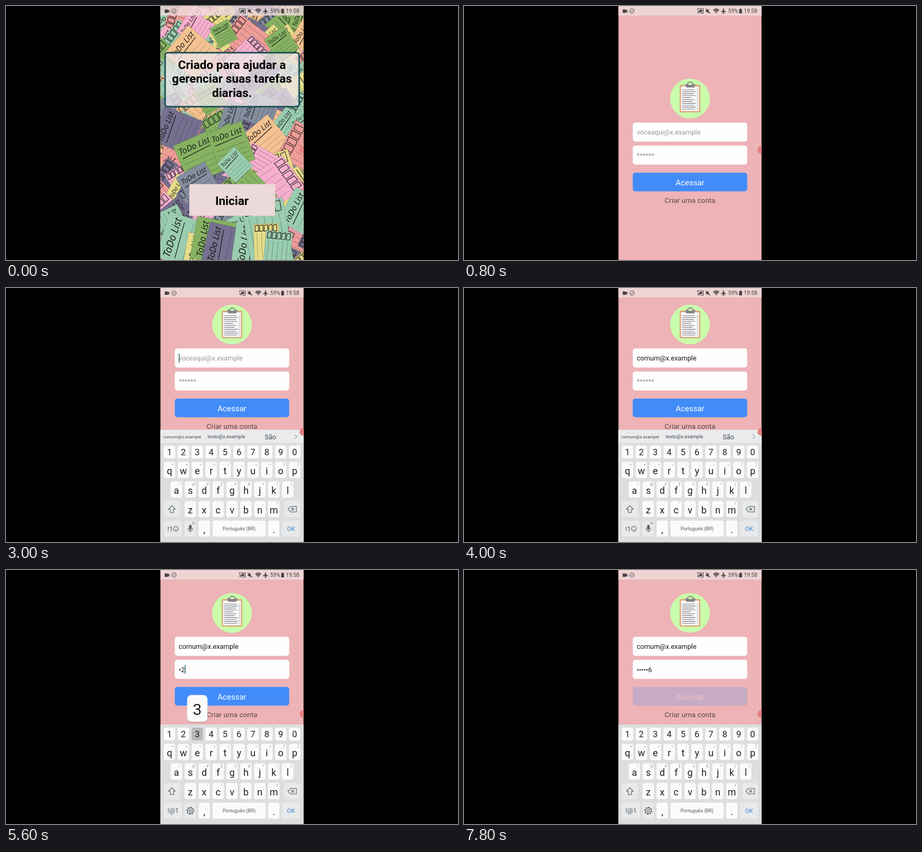
An HTML page that plays this animation: 853 px wide and 480 px high, repeating every 8000 ms.

```html
<!DOCTYPE html>
<html lang="pt-BR">
<head>
<meta charset="utf-8">
<title>Lista de tarefas</title>
<style>
  html, body { margin: 0; width: 100%; height: 100%; overflow: hidden; background: #000; }
  #stage { display: block; width: 100vw; height: 100vh; }
  text { font-family: Roboto, sans-serif; white-space: pre; }
  .note { font-family: "Open Sans", sans-serif; font-style: italic; }
  .mid { text-anchor: middle; }
</style>
</head>
<body>
<svg id="stage" viewBox="0 0 853 480">
  <svg id="phone" x="291.5" width="270" height="480" viewBox="291.5 0 270 480"></svg>
</svg>
<script>
const LOOP = 8000;
const PLACEHOLDER = 'voceaqui@x.example', MAIL = 'comum@x.example', OTHER_MAIL = 'texto@x.example';

// Markup helpers
const esc = s => s.replace(/&/g, '&amp;').replace(/</g, '&lt;');
const rect = (x, y, w, h, fill, r = 0, extra = '') =>
  `<rect x="${x}" y="${y}" width="${w}" height="${h}" rx="${r}" fill="${fill}" ${extra}/>`;
const text = (s, x, y, size, fill, extra = '') =>
  `<text x="${x}" y="${y}" font-size="${size}" fill="${fill}" ${extra}>${esc(s)}</text>`;
const centred = (s, x, y, size, fill, extra = '') => text(s, x, y, size, fill, 'class="mid" ' + extra);
const stroke = (d, color, width = 1, extra = '') =>
  `<path d="${d}" fill="none" stroke="${color}" stroke-width="${width}" ${extra}/>`;
const group = (id, body, extra = '') => `<g id="${id}" ${extra}>${body}</g>`;

// Paper notes behind the start screen
const PAPER = ['#ee9c98', '#f5afcd', '#86b262', '#9acdb0', '#848e9f', '#75708f', '#e6dc88', '#f3c290'];
const [SALMON, PINK, GREEN, MINT, SLATE, PURPLE, YELLOW, PEACH] = PAPER.keys();

function note([x, y, angle, w, color], boxes) {
  const h = w * (boxes ? 1.5 : 1.1);
  let body = rect(-w / 2, -w * .24, w, h, PAPER[color], 0, 'stroke="#000" stroke-opacity=".2" stroke-width=".8"');
  if (boxes) {
    let frames = '', rules = '';
    for (let i = 0; i < 5; i++) {
      const left = w * (i * .18 - .43);
      frames += `M${left} ${-w * .18}l${w * .13} ${-w * .02}v${w * .24}l${-w * .14} ${w * .01}z`;
      rules += `M${left + w * .06} ${w * .12}v${w * .95}`;
    }
    body += stroke(frames, '#1d1b1b', 1.1) + stroke(rules, '#000', .7, 'opacity=".4"');
  } else {
    body += text('ToDo List', 0, w * .05, w * .215, '#161616', 'class="note mid"')
      + stroke(`M${-w * .4} ${w * .16}L${w * .38} ${w * .12}`, '#161616', 1.2)
      + stroke([.32, .46, .6, .74].map(k => `M${-w * .42} ${w * k}h${w * .84}`).join(''), '#000', .7, 'opacity=".35"');
  }
  return `<g transform="translate(${x} ${y}) rotate(${angle})">${body}</g>`;
}

function collage() {
  let seed = 11, out = '';
  const random = () => (seed = seed * 16807 % 2147483647) / 2147483647;
  for (let y = -15; y < 500; y += 32)
    for (let x = 280; x < 580; x += 34) {
      const leansRight = random() < .2;
      out += note([x + random() * 22, y + random() * 18, leansRight ? 45 + random() * 20 : -75 + random() * 45,
        44 + random() * 16, Math.floor(random() * 8)], random() < .5);
    }
  const lists = [
    [345, 34, -58, 50, PINK], [334, 74, -50, 70, PEACH], [405, 42, -28, 38, GREEN],
    [512, 60, -35, 46, GREEN], [378, 162, -30, 46, GREEN], [462, 190, -70, 56, SLATE],
    [303, 228, -68, 70, PURPLE], [478, 238, -40, 66, PEACH], [356, 266, -24, 74, GREEN],
    [417, 245, -20, 70, GREEN], [422, 290, -45, 46, MINT], [355, 322, -30, 62, SLATE],
    [545, 382, -62, 72, MINT], [316, 438, -72, 90, MINT], [354, 462, -80, 64, YELLOW],
    [373, 440, -80, 80, GREEN], [395, 450, -77, 78, PURPLE], [450, 452, -82, 86, MINT]];
  const checks = [
    [390, 28, -40, 46, YELLOW], [436, 46, -52, 58, SALMON], [472, 78, 45, 48, PINK],
    [342, 224, 20, 54, SALMON], [545, 258, -62, 76, SALMON], [500, 300, -18, 78, YELLOW],
    [464, 282, -60, 44, PINK], [528, 322, 55, 74, PINK], [438, 326, -45, 60, GREEN],
    [486, 388, -10, 80, MINT], [491, 423, -2, 48, YELLOW], [515, 438, 6, 50, MINT]];
  return out + checks.slice(0, 4).map(n => note(n, true)).join('') + lists.slice(0, 8).map(n => note(n)).join('')
    + checks.slice(4, 9).map(n => note(n, true)).join('') + lists.slice(8).map(n => note(n)).join('')
    + checks.slice(9).map(n => note(n, true)).join('');
}

const startScreen = () => collage()
  + rect(300.2, 88.2, 253, 102, 'rgba(240,232,236,.76)', 5, 'stroke="#1f5357" stroke-width="3"')
  + ['Criado para ajudar a', 'gerenciar suas tarefas', 'diarias.']
    .map((s, i) => centred(s, 426.5, 118.8 + i * 26.4, 22.5, '#000', 'font-weight="700"')).join('')
  + group('startButton', rect(346, 336.5, 162, 60, '#ecd9db')
    + centred('Iniciar', 426.5, 375.5, 22.5, '#000', 'font-weight="700"'));

function clipboard() {
  const rows = [24, 26, 22, 25, 17, 24, 20, 26, 23, 26, 25];
  const rowY = i => 158.4 + i * 3.65;
  return `<circle cx="426.5" cy="175" r="37.5" fill="#c9fdab"/>`
    + rect(407, 149, 39, 52, '#dba778', 2) + rect(409.5, 152, 34, 46.5, '#fbfbfd')
    + stroke(rows.map((w, i) => `M411.5 ${rowY(i)}h${w}`).join(''), '#8e8c92', 1.4)
    + rows.map((w, i) => `<circle cx="440.5" cy="${rowY(i)}" r="1.2" fill="none" stroke="#aaa" stroke-width=".6"/>`).join('')
    + '<path d="M417 147.5h20l-2.5 6.5h-15z" fill="#858388"/>'
    + '<ellipse cx="427" cy="147" rx="5" ry="3.2" fill="#c9fdab" stroke="#858388" stroke-width="2"/>';
}

const field = y => rect(318.5, y, 216, 36, '#fefefe', 5);
const loginScreen = () => clipboard()
  + field(220.3) + field(263.8)
  + text('', 326, 243.2, 12.75, '#999', 'id="mail"')
  + text('', 326, 286.5, 12.75, '#999', 'id="password"')
  + rect(0, 0, 1.4, 17, '#1d6868', 0, 'id="caret"')
  + group('loginButton', rect(318.5, 315, 216, 35.2, '#428cfa', 5) + centred('Acessar', 426.5, 338.6, 15, '#fff'))
  + centred('Criar uma conta', 426.5, 372, 13.5, '#5b4748');

// On-screen keyboard
const PITCH = 26.25, KEY = '#fafbfb', DARK_KEY = '#e7e9ea', INK = '#202225', SOFT = '#55595d';
const keyRow = (chars, hints, x, y) => [...chars].map((c, i) => {
  const cx = x + i * PITCH;
  return rect(cx - 10.7, y, 21.4, hints ? 30.5 : 24.5, KEY, 4)
    + centred(c, cx, y + (hints ? 23.2 : 18), hints ? 18 : 16.5, INK)
    + (hints ? centred(hints[i], cx + 6.3, y + 7.8, 6.8, '#8b8f93') : '');
}).join('');

function keyboard() {
  const mailKeys = text('!1', 304.5, 459.5, 13, SOFT)
    + '<circle cx="320.5" cy="455" r="4.8" fill="none" stroke="#55595d"/>'
    + stroke('M317.8 456.2q2.7 3.2 5.4 0M318.9 452.6v1.4M322.1 452.6v1.4', SOFT, .9)
    + rect(345.6, 447.5, 4.6, 9, SOFT, 2.3)
    + stroke('M343.5 453.5q0 5.2 4.4 5.2t4.4-5.2M347.9 458.7v3.3', SOFT, 1.1)
    + '<circle cx="354" cy="444.5" r="2" fill="none" stroke="#888" stroke-width="1.2" stroke-dasharray="1.2 .5"/>';
  const passwordKeys = text('!@1', 304.8, 459.2, 12.4, SOFT)
    + '<circle cx="347.8" cy="455" r="5.4" fill="none" stroke="#55595d" stroke-width="1.2"/>'
    + '<circle cx="347.8" cy="455" r="6.7" fill="none" stroke="#55595d" stroke-width="1.4" stroke-dasharray="2.6 2.66"/>'
    + '<circle cx="347.8" cy="455" r="2.2" fill="none" stroke="#55595d" stroke-width="1.1"/>';
  return rect(291, 292, 271, 200, '#dcdee0')
    + group('suggestions', rect(291, 268, 271, 24.3, '#e9ebed')
      + text(MAIL, 297, 284, 8.1, '#44484b') + text(OTHER_MAIL, 380.5, 284, 9.2, '#44484b')
      + centred('São', 499, 285.5, 12.5, '#44484b') + stroke('M545 277l4 4-4 4', '#777', 1))
    + keyRow('1234567890', '', 308.5, 297.8)
    + keyRow('qwertyuiop', '+×÷=/_<>[]', 308.5, 328.6)
    + keyRow('asdfghjkl', '!@#$%&*()', 321.6, 365.6)
    + keyRow('zxcvbnm', '-\'":;,?', 347.8, 402.6)
    + rect(298, 402.6, 30, 30.5, DARK_KEY, 4) + rect(525, 402.6, 30, 30.5, DARK_KEY, 4)
    + stroke('M313 411.3l6.5 6.7h-3.4v6.2h-6.2v-6.2h-3.4z', SOFT, 1.1)
    + stroke('M537 412.7h11v10.6h-11l-5-5.3zM538.5 415.5l5 5m0-5l-5 5', SOFT, 1.1)
    + rect(298, 439.6, 34, 30.5, DARK_KEY, 4) + rect(337, 439.6, 21.5, 30.5, DARK_KEY, 4)
    + rect(363.4, 439.6, 21.4, 30.5, KEY, 4) + rect(389.8, 439.6, 100, 30.5, KEY, 4)
    + rect(494.6, 439.6, 21.4, 30.5, KEY, 4) + rect(521, 439.6, 34, 30.5, DARK_KEY, 4)
    + centred(',', 374.2, 463, 18, INK) + centred('.', 505.3, 463, 18, INK)
    + centred('Português (BR)', 439.8, 458.2, 9.2, SOFT) + centred('OK', 538, 459, 11.6, '#3b86d6')
    + group('mailKeys', mailKeys) + group('passwordKeys', passwordKeys)
    + rect(0, 297.8, 21.4, 24.5, '#000', 4, 'id="pressed" opacity=".27"');
}

const popup = () => rect(-19.3, 237.5, 38.6, 51, 'rgba(0,0,0,.16)', 8)
  + rect(-19.3, 236.3, 38.6, 50.5, '#fbfcfc', 8)
  + centred('', 0, 273.5, 30, INK, 'id="popupDigit"');

const statusBar = () => rect(291, 0, 271, 18, '#f0dcdc', 0, 'opacity=".8"')
  + '<g fill="#454041">'
  + '<path d="M299.5 6.5h6v2l2.7-1.7v6l-2.7-1.7v2h-6z"/>'
  + '<path d="M470.3 7.6q5.7-5 11.4 0L476 14.8z" opacity=".55"/>'
  + stroke('M470.5 7.7q5.5-4.6 11 0M472.5 10q3.5-2.8 7 0', '#454041', 1.2)
  + '<path d="M489.7 4.3l1 1v3l4 2.6v1l-4-1.2v2.2l1.2 1v.8l-2.2-.6-2.2.6v-.8l1.2-1v-2.2l-4 1.2v-1l4-2.6v-3z"/>'
  + '<path d="M456.5 7.8h2l3-2.6v8.6l-3-2.6h-2z"/>'
  + '<path d="M519.4 6h1.4V4.8h2.4V6h1.4v8h-5.2z"/></g>'
  + stroke('M456 4.8l9 9.4', '#454041', 1.2)
  + stroke('M440.5 7.5v-2.2h11v8.4h-5M440.5 9.5q4 0 4 4.2M440.5 11.6q2 0 2 2.1', '#454041', 1.1)
  + rect(444, 7.3, 5.6, 4.2, '#454041')
  + '<circle cx="317" cy="9.5" r="4.2" fill="none" stroke="#454041"/>'
  + stroke('M315 9.5l1.5 1.6 3-3.4', '#454041', 1)
  + text('59%', 498.5, 13.4, 10.3, '#454041') + text('19:58', 528, 13.4, 10.3, '#454041');

const $ = id => document.getElementById(id);
$('phone').innerHTML = rect(291, 0, 271, 480, '#edb3b6')
  + group('login', loginScreen())
  + group('backing', rect(291, 268, 271, 212, '#f6f6f7'))
  + group('keyboard', keyboard())
  + group('popup', popup())
  + group('start', startScreen())
  + statusBar()
  + '<circle cx="561" cy="272" r="7.2" fill="#e5807d"/>';

// Timeline, in ms
const FOCUS_MAIL = 1600, KEYBOARD_IN = 1800, FILL_MAIL = 3400, FOCUS_PASSWORD = 4050;
const TAPS = [5150, 5350, 5550, 6000, 6400, 6780].map((down, i) => ({ digit: i + 1, down, up: down + 120 }));

const ramp = (t, a, b) => Math.min(1, Math.max(0, (t - a) / (b - a)));
const show = (id, on) => $(id).setAttribute('visibility', on ? 'inherit' : 'hidden');
const setAttr = (id, name, value) => $(id).setAttribute(name, value);
function setField(id, value, hint) {
  $(id).textContent = value || hint;
  setAttr(id, 'fill', value ? '#161616' : '#999');
}

function render(t) {
  const inPassword = t >= FOCUS_PASSWORD, keyboardUp = t >= KEYBOARD_IN;

  setAttr('startButton', 'opacity', 1 - .8 * ramp(t, 100, 250));
  setAttr('start', 'opacity', 1 - ramp(t, 350, 650));
  show('start', t < 650);

  setAttr('login', 'transform', `translate(0 ${inPassword ? -94 : keyboardUp ? -106 : 0})`);
  setAttr('loginButton', 'opacity', 1 - .78 * ramp(t, 7500, 7680));

  const slide = ramp(t, KEYBOARD_IN, KEYBOARD_IN + 400);
  show('keyboard', keyboardUp);
  show('backing', keyboardUp && !inPassword);
  setAttr('keyboard', 'transform', `translate(0 ${26 * (1 - slide) ** 2})`);
  setAttr('keyboard', 'opacity', .5 + .5 * slide);
  show('suggestions', !inPassword);
  show('mailKeys', !inPassword);
  show('passwordKeys', inPassword);

  const typed = TAPS.filter(tap => t >= tap.up);
  const mail = t >= FILL_MAIL ? MAIL : '';
  const password = typed.length ? '•'.repeat(typed.length - 1) + typed.length : '';
  setField('mail', mail, PLACEHOLDER);
  setField('password', password, '******');

  const tap = TAPS.find(k => t >= k.down && t < k.up);
  show('pressed', tap);
  show('popup', tap);
  if (tap) {
    const cx = 308.5 + (tap.digit - 1) * PITCH;
    setAttr('pressed', 'x', cx - 10.7);
    setAttr('popup', 'transform', `translate(${Math.max(cx, 317.3)} 0)`);
    $('popupDigit').textContent = tap.digit;
  }

  // The caret blinks every 500 ms, restarting after each edit
  const lastEdit = Math.max(...[FOCUS_MAIL, FILL_MAIL, FOCUS_PASSWORD, ...TAPS.map(k => k.up)].filter(e => e <= t));
  show('caret', t >= FOCUS_MAIL && Math.floor((t - lastEdit) / 500) % 2 === 0);
  const width = (inPassword ? password : mail) ? $(inPassword ? 'password' : 'mail').getComputedTextLength() : 0;
  setAttr('caret', 'x', 326 + width);
  setAttr('caret', 'y', inPassword ? 273.5 : 230);
}

function tick() {
  render(performance.now() % LOOP);
  requestAnimationFrame(tick);
}
tick();
</script>
</body>
</html>
```
